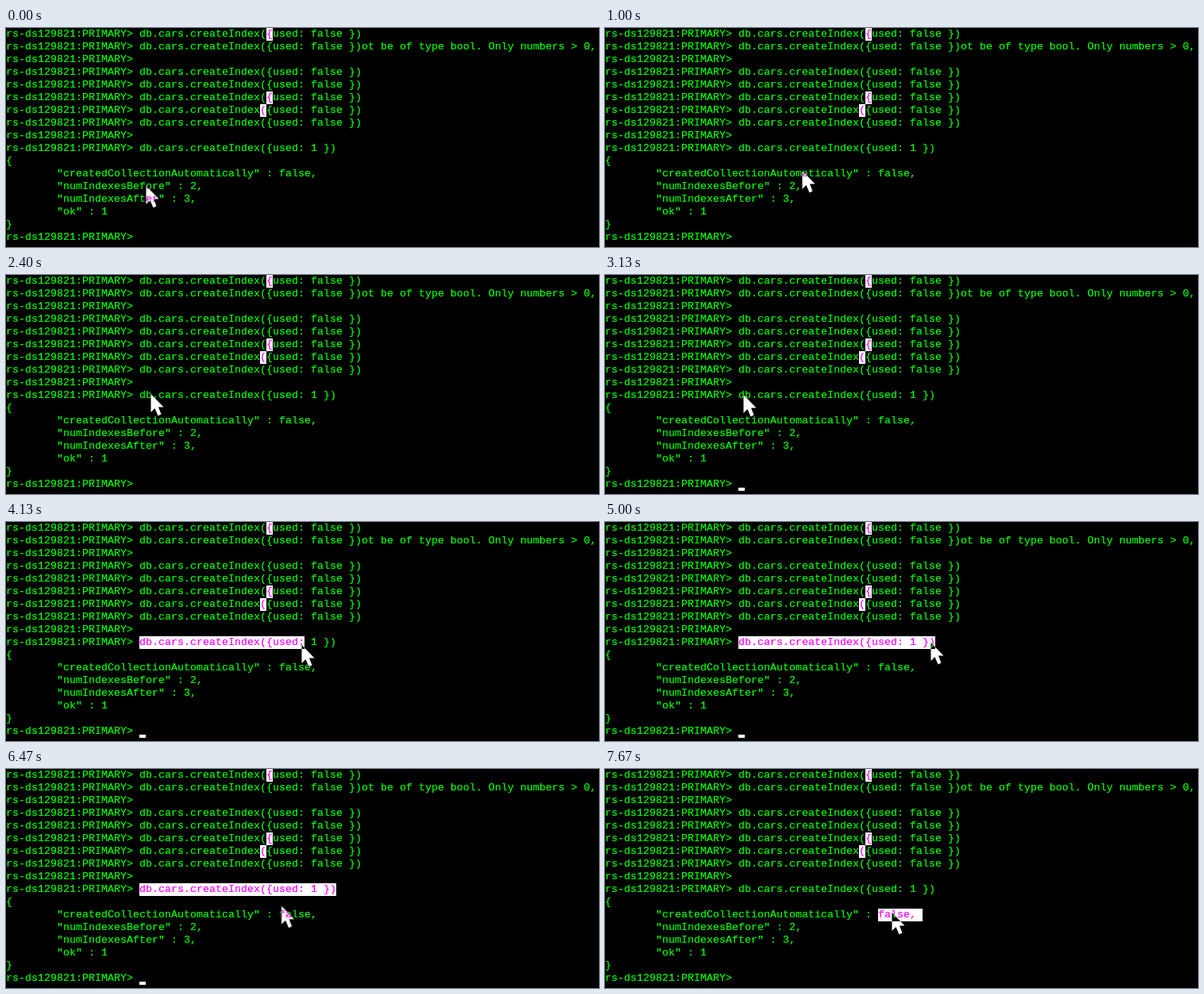
Recreate the animation shown at these times as an HTML page. Size 747 by 276 pixels, loop 8000 ms.

```html
<!DOCTYPE html>
<html lang="en">
<head>
<meta charset="utf-8">
<title>Shell session</title>
<style>
html, body { margin: 0; width: 100%; height: 100%; overflow: hidden; background: #000; }
#term { position: relative; width: 747px; height: 276px; overflow: hidden; background: #000; isolation: isolate; }
pre {
  margin: 0; color: #0f0;
  font: 13.3333px/16px "Liberation Mono", "Courier New", monospace;
  -webkit-text-stroke: .2px #0f0;
}

/* Inverts whatever lies beneath: black to white, green to magenta */
.inv { position: absolute; height: 16px; background: #fff; mix-blend-mode: difference; }
.brace { width: 8px; }

/* Everything runs at 15 steps a second, 120 to a loop */
#arrow, #sel, #caret { animation: 8s -4ms infinite step-end; }
#arrow {
  left: 0; top: 0; width: 17px; height: 28px;
  clip-path: polygon(.5px 0, .5px 23px, 5.5px 18px, 9.5px 27.5px, 13.5px 25.5px, 10px 16.5px, 16.5px 16.5px);
  animation-name: point;
}
#sel { left: 168px; top: 144px; animation-name: select; }
#caret { position: absolute; left: 168px; top: 268px; width: 8px; height: 4px; background: #fff; animation-name: blink; }

@keyframes point {
  0% { transform: translate(176px, 199px); animation-timing-function: steps(2); }
  1.667%, 5.833% { transform: translate(179px, 203px); animation-timing-function: steps(6); }
  10.833% { transform: translate(252px, 184px); animation-timing-function: steps(2); }
  12.5% { transform: translate(248px, 180px); animation-timing-function: steps(2); }
  14.167%, 15% { transform: translate(232px, 174px); animation-timing-function: steps(14); }
  26.667%, 27.5% { transform: translate(171px, 155px); animation-timing-function: steps(3); }
  30% { transform: translate(182px, 150px); animation-timing-function: steps(4); }
  33.333% { transform: translate(239px, 155px); animation-timing-function: steps(7); }
  39.167%, 40% { transform: translate(174px, 151px); animation-timing-function: steps(4); }
  43.333% { transform: translate(160px, 150px); animation-timing-function: steps(10); }
  51.667% { transform: translate(372px, 155px); animation-timing-function: steps(7); }
  57.5%, 67.5% { transform: translate(410px, 152px); animation-timing-function: steps(5); }
  71.667% { transform: translate(307px, 139px); animation-timing-function: steps(15); }
  84.167%, 90% { transform: translate(361px, 185px); animation-timing-function: steps(2); }
  91.667%, 100% { transform: translate(361px, 181px); }
}

/* Drag over the command, click to clear, double click on a word */
@keyframes select {
  0%, 81.667% { left: 168px; top: 144px; width: 0; }
  45% { width: 16px; animation-timing-function: steps(8); }
  51.667% { width: 208px; animation-timing-function: steps(5); }
  55.833% { width: 248px; }
  83.333%, 100% { left: 344px; top: 176px; width: 56px; }
}

@keyframes blink {
  0%, 42.5%, 55.833%, 69.167%, 82.5%, 95.833%, 100% { opacity: 0; }
  35.833%, 49.167%, 62.5%, 75.833%, 89.167% { opacity: 1; }
}
</style>
</head>
<body>
<div id="term">
<pre>rs-ds129821:PRIMARY&gt; db.cars.createIndex({used: false })
rs-ds129821:PRIMARY&gt; db.cars.createIndex({used: false })ot be of type bool. Only numbers &gt; 0,
rs-ds129821:PRIMARY&gt;
rs-ds129821:PRIMARY&gt; db.cars.createIndex({used: false })
rs-ds129821:PRIMARY&gt; db.cars.createIndex({used: false })
rs-ds129821:PRIMARY&gt; db.cars.createIndex({used: false })
rs-ds129821:PRIMARY&gt; db.cars.createIndex({used: false })
rs-ds129821:PRIMARY&gt; db.cars.createIndex({used: false })
rs-ds129821:PRIMARY&gt;
rs-ds129821:PRIMARY&gt; db.cars.createIndex({used: 1 })
{
        "createdCollectionAutomatically" : false,
        "numIndexesBefore" : 2,
        "numIndexesAfter" : 3,
        "ok" : 1
}
rs-ds129821:PRIMARY&gt;</pre>
<div class="inv brace" style="left:328px;top:0"></div>
<div class="inv brace" style="left:328px;top:80px"></div>
<div class="inv brace" style="left:320px;top:96px"></div>
<div class="inv" id="sel"></div>
<div id="caret"></div>
<div class="inv" id="arrow"></div>
</div>
</body>
</html>
```
